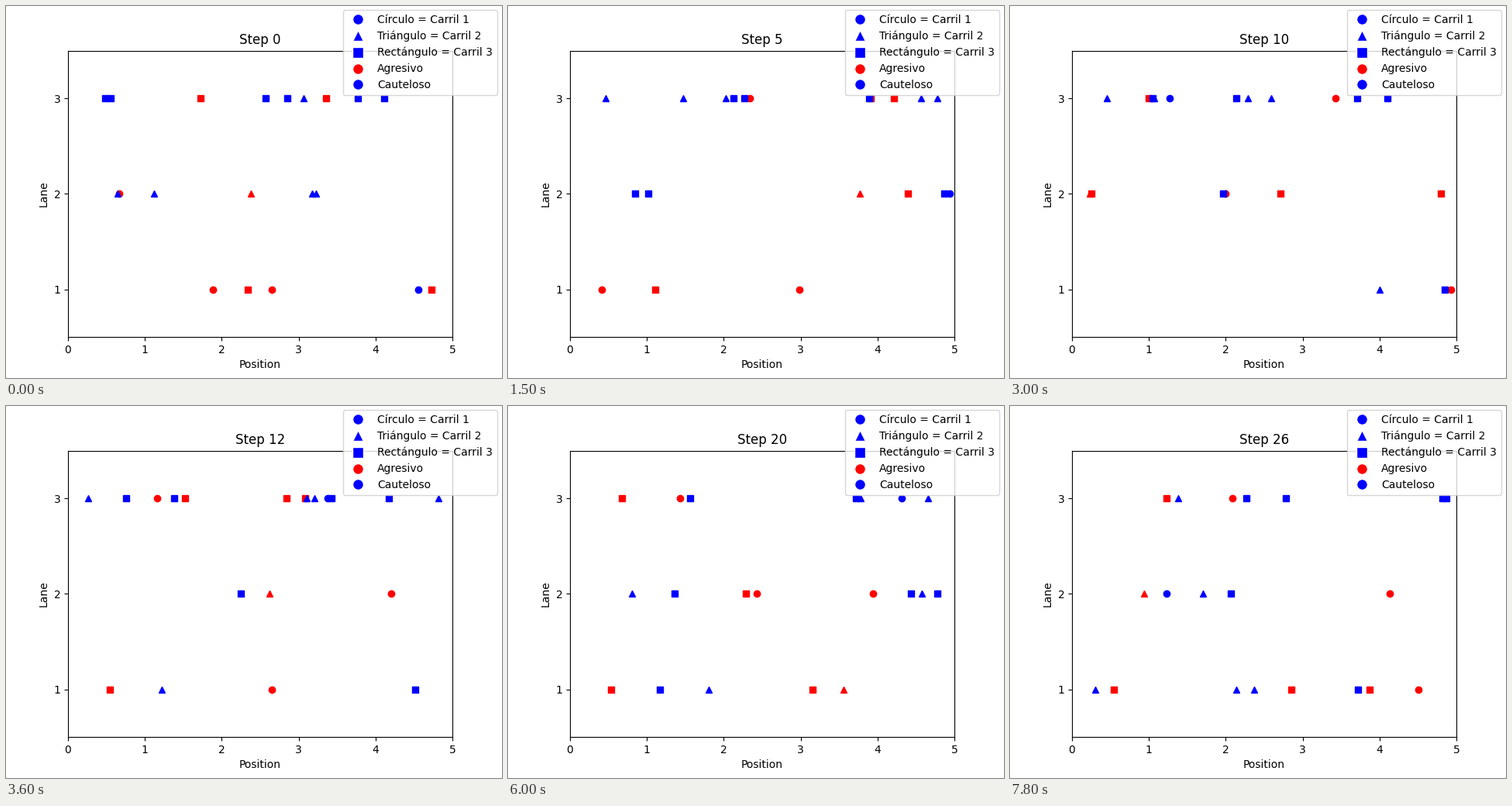
Animation, 640 px wide and 480 px high, one loop 8 s. Source, as a matplotlib script:

```python
import numpy as np
import matplotlib.pyplot as plt
from matplotlib.animation import FuncAnimation
from matplotlib.lines import Line2D

ROAD = 5
LANES = (1, 2, 3)
STEPS = 27
FRAME_MS = 100
FRAMES = 80
FRAMES_PER_STEP = 3
SPEED_RANGE = (0.8, 1.7)    # advance per step
LANE_CHANGE_CHANCE = 0.3

# Starting places: (marker, colour, lane, positions), drawn in this order
STARTS = [
    ("o", "red", 2, [0.665]),
    ("o", "red", 1, [1.885, 2.65]),
    ("o", "blue", 1, [4.555]),
    ("s", "red", 3, [1.725, 3.355]),
    ("s", "red", 1, [2.34, 4.725]),
    ("s", "blue", 3, [0.485, 0.555, 2.57, 2.855, 3.77, 4.11]),
    ("^", "red", 2, [2.38]),
    ("^", "blue", 2, [0.645, 1.12, 3.175, 3.225]),
    ("^", "blue", 3, [3.065]),
]

LEGEND = [
    ("o", "blue", "Círculo = Carril 1"),
    ("^", "blue", "Triángulo = Carril 2"),
    ("s", "blue", "Rectángulo = Carril 3"),
    ("o", "red", "Agresivo"),
    ("o", "blue", "Cauteloso"),
]


def simulate(x, lane, seed=4):
    """Drive every car round the ring road, with occasional lane changes."""
    rng = np.random.default_rng(seed)
    history = [(x, lane)]
    for _ in range(STEPS - 1):
        x = (x + rng.uniform(*SPEED_RANGE, x.size)) % ROAD
        turns = rng.random(x.size) < LANE_CHANGE_CHANCE
        shift = turns * rng.choice([-1, 1], x.size)
        lane = np.clip(lane + shift, LANES[0], LANES[-1])
        history.append((x, lane))
    return history


cars = [(marker, color, lane, x)
        for marker, color, lane, xs in STARTS for x in xs]
history = simulate(np.array([car[3] for car in cars]),
                   np.array([car[2] for car in cars]))

plt.rcParams["font.family"] = "DejaVu Sans"
fig, ax = plt.subplots(figsize=(6.4, 4.8), dpi=100)
ax.set(xlim=(0, ROAD), ylim=(0.5, 3.5), yticks=LANES,
       xlabel="Position", ylabel="Lane")
title = ax.set_title("Step 0")

dots = [ax.plot([], [], marker=marker, color=color, linestyle="none")[0]
        for marker, color, _, _ in cars]

handles = [Line2D([0], [0], marker=marker, color="w", markerfacecolor=color,
                  markersize=10, label=text)
           for marker, color, text in LEGEND]
ax.legend(handles=handles, loc="upper right", borderaxespad=0,
          bbox_to_anchor=(633.5 / 640, 475 / 480),
          bbox_transform=fig.transFigure)


def update(frame):
    step = frame // FRAMES_PER_STEP
    title.set_text(f"Step {step}")
    for dot, x, lane in zip(dots, *history[step]):
        dot.set_data([x], [lane])
    return [title, *dots]


anim = FuncAnimation(fig, update, frames=FRAMES, interval=FRAME_MS,
                     repeat=True, repeat_delay=0, blit=False)
plt.show()
```
